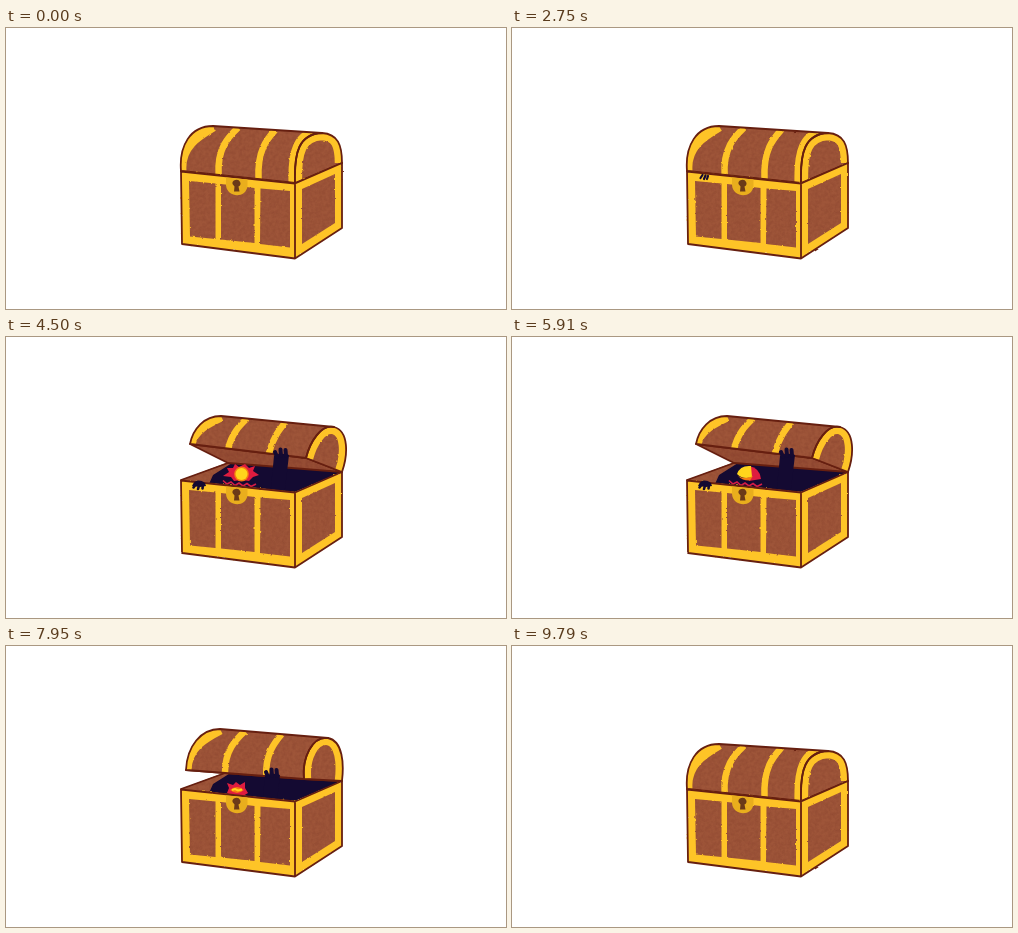
Write an HTML page that moves like this. It is 500x281 px and loops after 9870 ms.

```html
<!DOCTYPE html>
<html lang="en">
<head>
<meta charset="utf-8">
<title>Chest</title>
<style>
  html, body { margin: 0; width: 100%; height: 100%; overflow: hidden; background: #fff; }
  svg { display: block; width: 100vw; height: 100vh; }
  .line { fill: none; stroke: #661f10; stroke-width: 1.8; stroke-linejoin: round; stroke-linecap: round; }
  .gold { fill: none; stroke: #fec427; }
  .wood { fill: #9e5539; }
  .dark { fill: #140a32; }
  .limb { fill: none; stroke: #140a32; stroke-linecap: round; stroke-linejoin: round; }
</style>
</head>
<body>
<svg viewBox="0 0 500 281">
  <defs>
    <filter id="rough" filterUnits="userSpaceOnUse" x="0" y="0" width="500" height="281" color-interpolation-filters="sRGB">
      <feTurbulence class="noise" type="fractalNoise" baseFrequency=".3" numOctaves="2"/>
      <feDisplacementMap in="SourceGraphic" scale="2.2" xChannelSelector="R" yChannelSelector="G"/>
    </filter>
    <filter id="wobble" filterUnits="userSpaceOnUse" x="0" y="0" width="500" height="281" color-interpolation-filters="sRGB">
      <feTurbulence class="noise" type="fractalNoise" baseFrequency=".1" numOctaves="2"/>
      <feDisplacementMap in="SourceGraphic" scale="1.5" xChannelSelector="R" yChannelSelector="G"/>
    </filter>
    <filter id="grain" filterUnits="userSpaceOnUse" x="0" y="0" width="500" height="281" color-interpolation-filters="sRGB">
      <feTurbulence class="noise" type="fractalNoise" baseFrequency=".3" numOctaves="2"/>
      <feColorMatrix values="0 0 0 0 .35  0 0 0 0 .1  0 0 0 0 .08  .3 0 0 0 -.1"/>
      <feComposite in2="SourceAlpha" operator="in" result="spots"/>
      <feMerge><feMergeNode in="SourceGraphic"/><feMergeNode in="spots"/></feMerge>
    </filter>
    <clipPath id="frontClip"><path data-d="front"/></clipPath>
    <clipPath id="endClip"><path data-d="end"/></clipPath>
  </defs>

  <g id="inside">
    <path class="dark" d="M175 143L222 126L336 135L289 155Z"/>
    <path class="wood" filter="url(#grain)" d="M175 143L220 126H226L207 138L203 147Z"/>
    <path class="line" d="M175 143L222 126"/>
  </g>

  <g id="lid">
    <path class="wood" data-d="under" filter="url(#grain)"/>
    <path data-d="under" fill="#5a1710" opacity=".12"/>
    <path class="line" data-d="under" filter="url(#wobble)"/>
    <g filter="url(#grain)">
      <path class="wood" data-d="front"/>
      <path class="wood" data-d="end"/>
    </g>
    <g clip-path="url(#frontClip)"><g class="gold" filter="url(#rough)">
      <path data-d="band0" stroke-width="11"/>
      <path data-d="band1" stroke-width="6.5"/>
      <path data-d="band2" stroke-width="6.5"/>
      <path id="trim" data-d="arch" stroke-width="13"/>
    </g></g>
    <g clip-path="url(#endClip)"><path class="gold" data-d="arch" stroke-width="14.5" filter="url(#rough)"/></g>
    <g class="line" filter="url(#wobble)">
      <path data-d="front"/>
      <path data-d="end"/>
    </g>
  </g>

  <g id="beast">
    <g id="arm">
      <path class="dark" d="M268 119Q275 115 283 118L278 160H264Z"/>
      <path class="limb" stroke-width="4" d="M271 120L269 115M275 119L274.500 112.500M280 119L279.500 113"/>
    </g>
    <path id="mouth" fill="none" stroke="#d41c46" stroke-width="1.600" d="M217 143.500L221 147L225 145L229 148.500L233 146L237 149L241 146.500L245 149.500L250 147"/>
    <g id="stare">
      <path fill="#df1c3f" d="M217 139L223 135L221 131L227 131L229 127L233 130L239 127L243 131L249 129L247 134L253 138L247 140L243 144L236 143L228 144L225 140Z"/>
      <circle cx="235.500" cy="137" r="7.400" fill="#f57a13"/>
      <circle cx="235.500" cy="137" r="6" fill="#ffd51c"/>
    </g>
    <g id="glance">
      <path fill="#df1c3f" d="M237 129Q248 131 249 142L237 144Z"/>
      <path fill="#ffd51c" d="M225 137Q228 128 239 129L240 140Q231 143 225 137Z"/>
      <path fill="#f57a13" d="M226 139Q233 143 241 139L238 143.500Q231 144 226 139Z"/>
    </g>
    <g id="squint">
      <path fill="#df1c3f" d="M221 147L223 142L221 137L227 139L230 136L234 139L239 136L239 142L242 147L237 150H226Z"/>
      <path fill="#f57a13" d="M224 144Q231 138 238 144Q231 150 224 144Z"/>
      <path fill="none" stroke="#ffd51c" stroke-width="2" d="M226 144L229 143L232 144.500L236 143.500"/>
    </g>
  </g>

  <g id="body">
    <path fill="#fec427" d="M175 143L289 155L336 135V200L289 230L176 216Z" filter="url(#rough)"/>
    <g filter="url(#rough)"><g class="wood" filter="url(#grain)">
      <path d="M183 153L209.500 155.500V211L184 208.500Z"/>
      <path d="M215 156L248.500 160V215L215 211.500Z"/>
      <path d="M254.500 160.500L284 163V219.500L254 216Z"/>
      <path d="M296 161L329 146V195L296 216Z"/>
    </g></g>
    <path class="line" filter="url(#wobble)" d="M175 143.500L289 155.500L336 135V200L289 230.500L176 216ZM289 155.500V230"/>
    <path fill="#e9ae1d" d="M220 149.500L241.500 151.500V158C240 171 221 170 220 157Z"/>
    <path fill="#6b3a18" d="M226.500 156A4 3.600 0 1 1 232.500 158.500L233.500 163.500H228L228.500 158.500Z"/>
  </g>

  <path id="reach" class="limb" stroke-width="6"/>
  <g id="grip">
    <path class="dark" d="M186 149Q190 140 199 146L200 149L194 150Z"/>
    <path class="limb" stroke-width="2.600" d="M190 147L187.500 150.500M193.500 147L192 152M197 147L196.500 151.500"/>
  </g>
  <path id="tips" class="limb" stroke-width="2.200" d="M190.500 147L188.500 150M193.500 147.500L192 151M196 148L195 151"/>
</svg>
<script>
const LOOP = 9870;
const $ = id => document.getElementById(id);
const shapes = [...document.querySelectorAll('[data-d]')];
const noise = document.querySelectorAll('.noise');

// Lid poses: left curve (4 points), then arch (4 + 2 points)
const poses = [
  [175,143, 173,118, 184,98, 207,98, 289,155, 288,124, 293,106, 316,105, 332,106, 336,117],
  [180,124, 181,100, 195,83, 214,83, 298,133, 296,112, 306,90, 322,92, 337,95, 338,118],
  [184,107, 187,92, 198,79, 215,79, 300,121, 304,105, 315,87, 328,90, 343,94, 342,118]
];
const hinge = [336, 135], back = [222, 126];
const lidKeys = [[2830,0],[3080,1.06],[3200,1],[3790,1],[4000,2.04],[4120,2],[7210,2],[7340,2.35],[7500,2],[7760,1],[9000,1],[9260,0]];
const reachKeys = [[7230,0],[7370,1],[7500,1],[7640,0]];

const mix = (a, b, k) => a + (b - a) * k;
const mixPt = (a, b, k) => [mix(a[0], b[0], k), mix(a[1], b[1], k)];
const show = (id, on) => { $(id).style.display = on ? '' : 'none'; };

function track(keys, t) {
  if (t <= keys[0][0]) return keys[0][1];
  for (let i = 1; i < keys.length; i++) {
    const [t0, a] = keys[i - 1], [t1, b] = keys[i];
    if (t < t1) {
      const k = (t - t0) / (t1 - t0);
      return mix(a, b, k * k * (3 - 2 * k));
    }
  }
  return keys[keys.length - 1][1];
}

function lidPaths(open) {
  const i = open < 1 ? 0 : 1;
  const n = poses[i].map((v, j) => mix(v, poses[i + 1][j], open - i));
  const p = n.filter((_, j) => j % 2 === 0).map((x, j) => [x, n[j * 2 + 1]]);
  const left = p.slice(0, 4), rim = p.slice(4, 8);
  const curve = c => `M${c[0]}C${c.slice(1).join(' ')}`;
  const band = (low, high) => {
    const a = mixPt(left[0], rim[0], low);
    const c = mixPt(left[1], rim[1], low);
    const b = mixPt(left[3], rim[3], high);
    return curve([a, c, mixPt(c, b, .55), b]);
  };
  const arch = `${curve(rim)}C${[p[8], p[9], hinge].join(' ')}`;
  return {
    front: `${curve(left)}L${rim[3]}C${[rim[2], rim[1], rim[0]].join(' ')}Z`,
    end: arch + 'Z',
    arch,
    under: `M${left[0]}L${rim[0]}L${hinge}L${back}Z`,
    band0: band(0, 0),
    band1: band(.33, .23),
    band2: band(.68, .57)
  };
}

function draw(now) {
  const t = now % LOOP;
  const open = track(lidKeys, t);
  const paths = lidPaths(open);
  shapes.forEach(s => s.setAttribute('d', paths[s.dataset.d]));

  const seed = 1 + Math.floor(t / 83.3) % 4;
  noise.forEach(f => f.setAttribute('seed', seed));

  const wide = open > 1.4, glance = t >= 5830 && t < 6120;
  show('trim', open < .4);
  show('inside', open > .02);
  show('beast', open > .55);
  show('stare', wide && !glance);
  show('glance', wide && glance);
  show('squint', !wide);
  show('mouth', wide);
  const drop = 2 - Math.min(open, 2);
  $('arm').setAttribute('transform', `translate(${-9 * drop} ${11 * drop})`);

  const out = track(reachKeys, t);
  const grip = open > .3 && t < 7700;
  show('grip', grip);
  show('tips', t >= 2670 && t < 7000 && !grip);
  show('reach', out > .02);
  $('grip').setAttribute('transform', `translate(${-34 * out} ${-9 * out})`);
  $('reach').setAttribute('d', `M212 140Q${200 - 14 * out} ${143 - 12 * out} ${194 - 34 * out} ${147 - 9 * out}`);
}

const start = performance.now();
function tick() {
  draw(performance.now() - start);
  requestAnimationFrame(tick);
}
tick();
</script>
</body>
</html>
```
